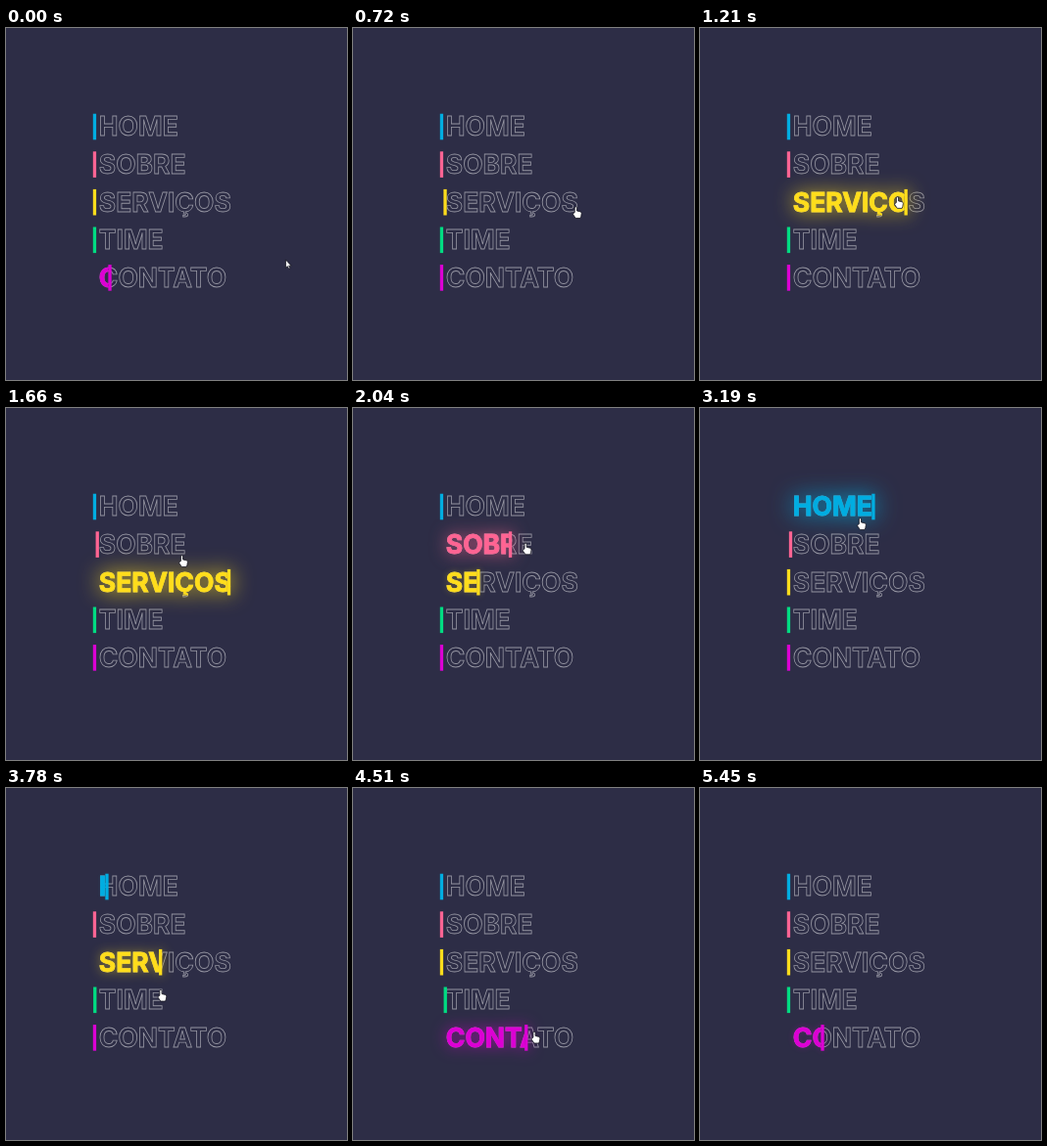
Write an HTML page with a canvas that moves like this. It is 348 px wide and 360 px high and loops after 5520 ms.

```html
<!DOCTYPE html>
<html lang="pt">
<head>
<meta charset="utf-8">
<title>Menu</title>
<style>
html, body { margin: 0; width: 100%; height: 100%; overflow: hidden; background: #2d2d46; }
canvas { display: block; width: 348px; height: 360px; }
</style>
</head>
<body>
<canvas id="stage"></canvas>
<script>
const W = 348, H = 360, LOOP = 5520, FADE = 1000;
const LEFT = 88.8, TEXT_X = 94.8, TOP = 87.7, PITCH = 38.6, BOX = 26.6, BASE = 22.6, BAR = 3.3, GLOW = 24;
const FONT = '700 26.5px Inter, "Open Sans", sans-serif';

const rows = [
  { text: 'HOME', color: '#00ade1' },
  { text: 'SOBRE', color: '#ff6493' },
  { text: 'SERVIÇOS', color: '#ffdd1c' },
  { text: 'TIME', color: '#00dc82' },
  { text: 'CONTATO', color: '#dc00d4' }
];

// pointer key points: time, x, y; hovering follows from them
const path = [
  [-1300, 200, 255], [-318, 242, 255], [0, 285.5, 237],
  [655, 241, 188], [720, 227.5, 183], [1600, 181, 164.9], [1615, 180, 152.5],
  [2403, 173, 126.3], [2440, 172, 114], [2840, 168, 102], [3235, 163, 114.3],
  [3435, 161, 164.9], [3735, 158.5, 191.5], [3780, 158, 206.5], [4120, 166, 230.1],
  [4150, 169, 242.1], [4510, 185, 249.5], [5122, 242, 256], [5320, 352, 266], [LOOP, 400, 270]
];

const arrow = new Path2D('M0 0V8.4L1.9 6.7 3.2 9.4 4.6 8.8 3.3 6.2H5.8Z');
const hand = new Path2D('M-1.2 5.6V.9a1.1 1.1 0 0 1 2.2 0V4l3.7.9q1.2.4 1.1 1.8L5.3 9.5 4.6 11.5H-.2L-2.8 7.8q-.6-1.2.5-1.3Z');

const scale = window.devicePixelRatio || 1;

function setup(canvas) {
  canvas.width = W * scale;
  canvas.height = H * scale;
  const c = canvas.getContext('2d');
  c.scale(scale, scale);
  c.font = FONT;
  c.lineWidth = 0.8;
  c.miterLimit = 3;
  return c;
}

const ctx = setup(document.getElementById('stage'));
const layer = setup(document.createElement('canvas'));

rows.forEach((row, i) => {
  row.top = TOP + i * PITCH;
  row.span = TEXT_X - LEFT + ctx.measureText(row.text).width + 3;
  row.hovers = [];
});

function pointer(t) {
  let i = 1;
  while (i < path.length - 1 && path[i][0] < t) i++;
  const [t0, x0, y0] = path[i - 1], [t1, x1, y1] = path[i];
  const k = (t - t0) / (t1 - t0);
  return [x0 + (x1 - x0) * k, y0 + (y1 - y0) * k];
}

function rowAt([x, y]) {
  return rows.find(r => x >= LEFT && x <= LEFT + r.span + BAR && y >= r.top && y <= r.top + BOX);
}

// collect when the pointer enters and leaves each row
let last;
for (let t = path[0][0]; t <= LOOP; t += 2) {
  const row = rowAt(pointer(t));
  if (row && row !== last) row.hovers.push({ enter: t, leave: t });
  if (row) row.hovers[row.hovers.length - 1].leave = t;
  last = row;
}

// cubic-bezier(.25, .1, .25, 1)
function ease(x) {
  if (x <= 0) return 0;
  if (x >= 1) return 1;
  let lo = 0, hi = 1;
  for (let i = 0; i < 24; i++) {
    const s = (lo + hi) / 2;
    const bx = 0.75 * s * (1 - s) + s * s * s;
    if (bx < x) lo = s; else hi = s;
  }
  const s = lo, r = 1 - s;
  return 0.3 * r * r * s + 3 * r * s * s + s * s * s;
}

// a reversed transition is shortened by how far it had come
function reveal(row, t) {
  let p = 0;
  for (const { enter, leave } of row.hovers) {
    if (t <= enter) continue;
    const peak = ease((Math.min(t, leave) - enter) / FADE);
    const back = t > leave && peak > 0 ? ease((t - leave) / (FADE * peak)) : 0;
    p = Math.max(p, peak * (1 - back));
  }
  return p;
}

function drawRow(row, t) {
  const { text, color, top, span } = row;
  const base = top + BASE, p = reveal(row, t), edge = LEFT + span * p;

  ctx.strokeStyle = 'rgba(255,255,255,.5)';
  ctx.strokeText(text, TEXT_X, base);

  layer.clearRect(0, 0, W, H);
  layer.fillStyle = layer.strokeStyle = color;
  if (p > 0) {
    layer.save();
    layer.beginPath();
    layer.rect(LEFT, top, edge - LEFT, BOX);
    layer.clip();
    layer.fillText(text, TEXT_X, base);
    layer.strokeText(text, TEXT_X, base);
    layer.restore();
  }
  layer.fillRect(edge, top, BAR, BOX);

  ctx.save();
  if (p > 0) {
    const alpha = Math.round(p * 255).toString(16).padStart(2, '0');
    ctx.shadowColor = color + alpha;
    ctx.shadowBlur = GLOW * p * scale;
  }
  ctx.drawImage(layer.canvas, 0, 0, W, H);
  ctx.restore();
}

function drawPointer(t) {
  const spot = pointer(t);
  const shape = rowAt(spot) ? hand : arrow;
  ctx.save();
  ctx.translate(...spot);
  ctx.fillStyle = '#fff';
  ctx.strokeStyle = '#15151f';
  ctx.fill(shape);
  ctx.stroke(shape);
  ctx.restore();
}

function frame(now) {
  const t = now % LOOP;
  ctx.fillStyle = '#2d2d46';
  ctx.fillRect(0, 0, W, H);
  rows.forEach(row => drawRow(row, t));
  drawPointer(t);
  requestAnimationFrame(frame);
}

frame(0);
</script>
</body>
</html>
```
